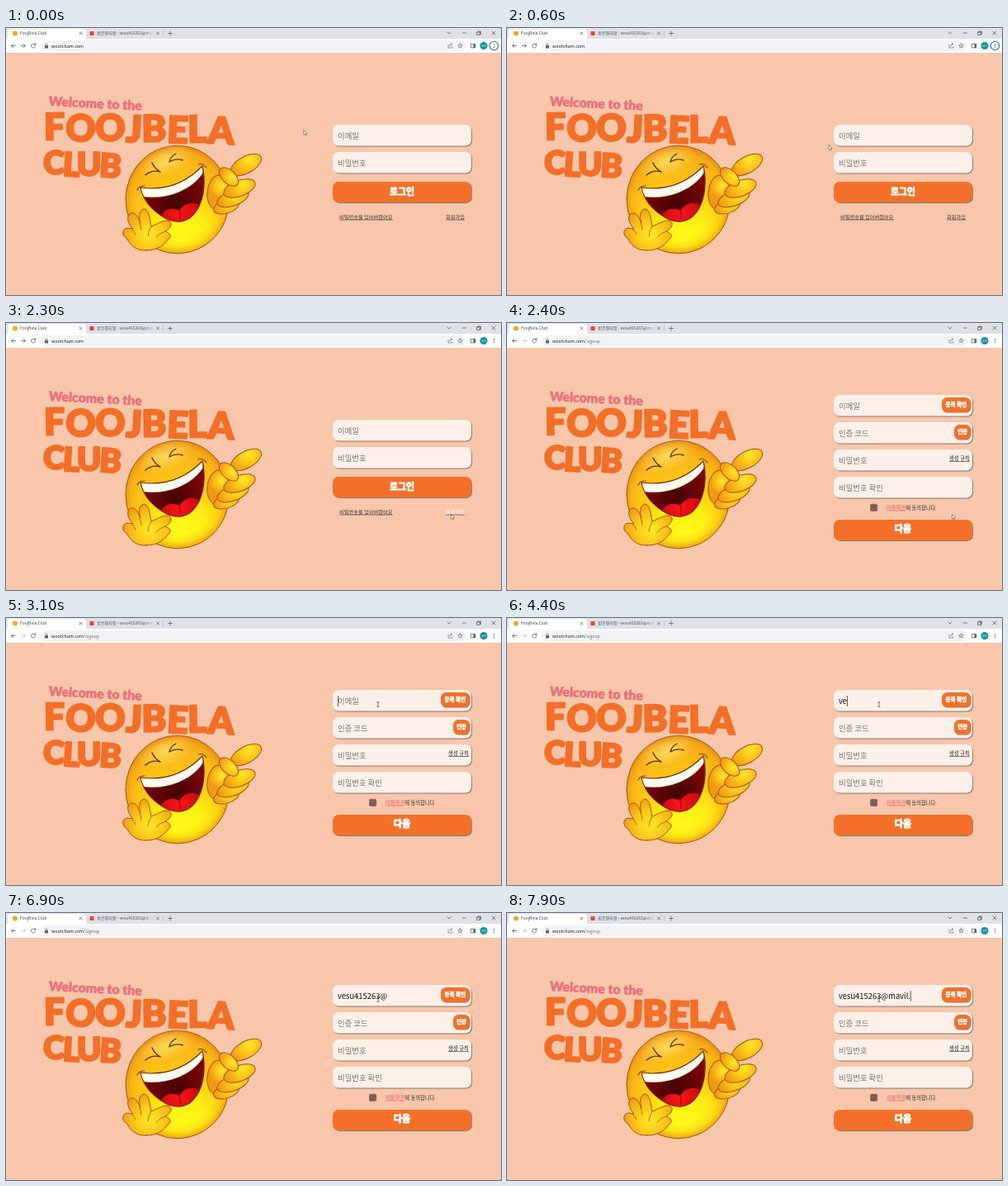
These frames come from a looping animation (600 px wide and 323 px high, 8000 ms). An HTML page with a canvas:

```html
<!DOCTYPE html>
<html lang="ko">
<head>
<meta charset="utf-8">
<title>FoojBela Club</title>
<style>
html, body { margin: 0; width: 100%; height: 100%; overflow: hidden; background: #f8c6aa; }
canvas { display: block; width: 600px; height: 323px; }
</style>
</head>
<body>
<canvas id="stage"></canvas>
<script>
const W = 600, H = 323, LOOP = 8000, STEP = 100;
const canvas = document.getElementById('stage');
const ctx = canvas.getContext('2d');
const scale = window.devicePixelRatio || 1;
canvas.width = W * scale;
canvas.height = H * scale;

const SANS = '"Noto Sans CJK KR", "Noto Sans CJK", "Noto Sans", sans-serif';
const ORANGE = '#f47028', CREAM = '#fdf0e8', INK = '#333', OUTLINE = '#a8520f', CREASE = '#b8600f';
const ADDRESS = 'vesu415263@mavil.';
const SIGNUP_AT = 2400, FOCUS_AT = 3100;

// [time, x, y, shape]
const pointer = [
  [0, 361, 124, 'arrow'], [100, 361, 124, 'arrow'], [300, 378, 134, 'arrow'],
  [600, 390, 142, 'arrow'], [800, 462, 190, 'hand'], [900, 488, 194, 'hand'],
  [1400, 505, 196, 'hand'], [1500, 539.5, 232, 'hand'], [2200, 539.5, 232, 'arrow'],
  [2600, 539.5, 232, 'arrow'], [2900, 484, 142, 'arrow'], [3000, 458, 110, 'beam'],
  [3100, 451, 104.5, 'beam'], [LOOP, 451, 104.5, 'beam']
];
// [time, characters typed]
const keys = [
  [FOCUS_AT, 0], [4300, 1], [4400, 2], [4500, 4], [4800, 4], [5100, 5], [5200, 6],
  [5400, 7], [5500, 8], [5600, 9], [5900, 10], [6400, 11], [7200, 12], [7400, 13],
  [7500, 14], [7600, 15], [7800, 16], [7900, 17]
];

const lastBefore = (list, t) => list.filter(k => k[0] <= t).pop();

function rect(x, y, w, h, r, color) {
  ctx.beginPath();
  ctx.roundRect(x, y, w, h, r);
  ctx.fillStyle = color;
  ctx.fill();
}

function disc(x, y, r, color) {
  ctx.beginPath();
  ctx.arc(x, y, r, 0, Math.PI * 2);
  ctx.fillStyle = color;
  ctx.fill();
}

function line(d, color = '#5f6368', width = 0.8) {
  ctx.strokeStyle = color;
  ctx.lineWidth = width;
  ctx.lineCap = ctx.lineJoin = 'round';
  ctx.stroke(new Path2D(d));
}

function shape(d, fill, stroke, width = 1) {
  ctx.fillStyle = fill;
  ctx.fill(new Path2D(d));
  if (stroke) line(d, stroke, width);
}

function label(text, x, y, size, color = INK, { weight = 400, underline, align = 'left' } = {}) {
  ctx.font = `${weight} ${size}px ${SANS}`;
  ctx.textAlign = align;
  ctx.fillStyle = color;
  ctx.fillText(text, x, y);
  if (weight === 900) {
    ctx.strokeStyle = color;
    ctx.lineWidth = size * 0.08;
    ctx.strokeText(text, x, y);
  }
  const width = ctx.measureText(text).width;
  if (underline) {
    ctx.fillStyle = underline;
    ctx.fillRect(x, y + 0.9, width, 0.6);
  }
  ctx.textAlign = 'left';
  return width;
}

function radial(x, y, r0, r1, ...colors) {
  const g = ctx.createRadialGradient(x, y, r0, x, y, r1);
  colors.forEach((c, i) => g.addColorStop(i / (colors.length - 1), c));
  return g;
}

function drawTabs() {
  rect(0, 0, W, 13, 0, '#dee1e6');
  rect(2, 1, 95, 14, [4, 4, 0, 0], '#fff');
  disc(11, 6.5, 3, '#f5a623');
  label('FoojBela Club', 17, 8.3, 5, '#3c4043');
  rect(101.5, 4, 5, 5, 0.5, '#ea4335');
  const fade = ctx.createLinearGradient(168, 0, 179, 0);
  fade.addColorStop(0, '#4a4e53');
  fade.addColorStop(1, '#dee1e6');
  ctx.save();
  ctx.beginPath();
  ctx.rect(108, 0, 71, 13);
  ctx.clip();
  label('받은편지함 - ' + ADDRESS, 110.5, 8.3, 5, fade);
  ctx.restore();
  for (const x of [90.5, 184]) line(`M${x - 1.5} 5l3 3m0 -3l-3 3`);
  line('M190.5 3.5v6', '#a0a4a9', 0.5);
  line('M196.5 6.5h5m-2.5 -2.5v5');
  line('M535 5l2 2l2 -2M553.5 6h4M571 5h3.4v3.4h-3.4zM572 5v-1h3.4v3.4h-1M589 4l4 4m0 -4l-4 4', '#333', 0.6);
}

function drawToolbar(t) {
  const signup = t >= SIGNUP_AT;
  rect(0, 13, W, 17, 0, '#fff');
  line('M11.5 21.5h-5m2.2 -2.2l-2.2 2.2l2.2 2.2');
  line('M18.5 21.5h5m-2.2 -2.2l2.2 2.2l-2.2 2.2', signup ? '#c4c7ca' : '#5f6368');
  line('M35.4 20a2.6 2.6 0 1 0 .4 2M35.9 18.4v2h-2');
  rect(42, 15, 515, 13, 6.5, '#f1f3f4');
  rect(47, 21, 4, 3.4, 0.5, '#5f6368');
  line('M47.9 21v-1a1.1 1.1 0 0 1 2.2 0v1', '#5f6368', 0.6);
  const end = 55 + label('wootcham.com', 55, 23.5, 5.4, '#202124');
  if (signup) label('/signup', end, 23.5, 5.4, '#6a6e73');
  line('M536 20v4h5v-1.5M537.5 22q.3 -2.5 3 -2.5m-1.2 -1.3l1.5 1.3l-1.5 1.4', '#5f6368', 0.6);
  let star = '';
  for (let i = 0; i < 10; i++) {
    const r = i % 2 ? 1.2 : 2.9, a = i * Math.PI / 5 - Math.PI / 2;
    star += (i ? 'L' : 'M') + (550.5 + r * Math.cos(a)) + ' ' + (21.7 + r * Math.sin(a));
  }
  line(star + 'Z', '#5f6368', 0.6);
  line('M563.8 19.3h5v4.6h-5z');
  rect(566.5, 19.3, 2.4, 4.6, 0, '#5f6368');
  disc(579, 21.5, 4.6, '#14949c');
  label('보리', 579, 22.8, 3.4, '#e6f4f4', { align: 'center' });
  if (t < 2200) {
    disc(591.5, 21.5, 5.4, '#fff');
    line('M586.3 21.5a5.2 5.2 0 1 1 10.4 0a5.2 5.2 0 1 1 -10.4 0', '#2b6fc2', 1.1);
  }
  for (const y of [19.4, 21.5, 23.6]) disc(591.5, y, 0.65, '#5f6368');
}

// Bouncy lettering: each letter is tilted slightly on a shared slope.
function wordmark(text, x, y, size, spacing, slope) {
  ctx.font = `900 ${size}px Lato, sans-serif`;
  ctx.fillStyle = ctx.strokeStyle = '#f36f27';
  ctx.lineWidth = 2;
  ctx.lineJoin = 'round';
  ctx.save();
  ctx.translate(x, y);
  ctx.rotate(slope);
  [...text].forEach((ch, i) => {
    const w = ctx.measureText(ch).width;
    ctx.save();
    ctx.translate(w / 2, i % 2 ? 0.8 : -0.4);
    ctx.rotate(i % 2 ? 0.03 : -0.03);
    ctx.fillText(ch, -w / 2, 0);
    ctx.strokeText(ch, -w / 2, 0);
    ctx.restore();
    ctx.translate(w + spacing, 0);
  });
  ctx.restore();
}

function drawTitle() {
  ctx.save();
  ctx.translate(51.5, 94);
  ctx.rotate(0.05);
  ctx.font = '900 15.8px Lato, sans-serif';
  ctx.fillStyle = ctx.strokeStyle = '#e9727c';
  ctx.lineWidth = 0.5;
  ctx.fillText('Welcome to the', 0, 0);
  ctx.strokeText('Welcome to the', 0, 0);
  ctx.restore();
  wordmark('FOOJBELA', 46, 135.5, 45, 0, 0.018);
  wordmark('CLUB', 45, 177.5, 40, -3.2, 0.03);
}

function finger(x, y, rx, ry, tilt) {
  ctx.save();
  ctx.translate(x, y);
  ctx.rotate(tilt);
  const oval = `M${-rx} 0a${rx} ${ry} 0 1 1 ${2 * rx} 0a${rx} ${ry} 0 1 1 ${-2 * rx} 0`;
  shape(oval, radial(rx * 0.3, -ry * 0.4, 1, rx * 1.2, '#ffe428', '#fcc018', '#f09a14'), OUTLINE);
  ctx.restore();
}

function drawBody() {
  const ball = 'M145 207.5a62.8 65.3 0 1 0 125.6 0a62.8 65.3 0 1 0 -125.6 0';
  shape(ball, radial(214, 254, 4, 116, '#fffa18', '#ffec14', '#fdc814', '#fab718', '#f7a81a'));
  shape(ball, radial(208, 207.5, 48, 66, 'rgba(226,120,10,0)', 'rgba(226,120,10,.15)', 'rgba(218,108,10,.6)'), OUTLINE);
  ctx.save();
  ctx.translate(194, 161);
  ctx.rotate(-0.35);
  ctx.scale(1, 0.5);
  disc(0, 0, 36, radial(0, 0, 2, 36, 'rgba(255,240,130,.6)', 'rgba(255,240,130,0)'));
  ctx.restore();
}

function drawMouth() {
  const mouth = 'M163 193Q207 199 238 167C242 183 241 206 231 221C220 238 203 237 188 227C174 218 166 207 163 193Z';
  shape(mouth, radial(205, 212, 4, 40, '#4a0204', '#7c0608'));
  ctx.save();
  ctx.clip(new Path2D(mouth));
  shape('M187 238C185 222 198 215 210 221C217 211 229 209 236 216L228 242Z', radial(210, 224, 3, 26, '#f41418', '#cc0810'));
  line('M210 221Q212 226 211 231', '#9a060c', 1);
  shape('M160 190Q207 199 240 164L238 176C226 195 196 208 167 204Z', '#fffdf0', '#c9b9a0', 0.5);
  ctx.restore();
  line(mouth, '#7a2a08', 1.1);
  line('M159 196Q161 191 168 191M233 165Q239 163 243 169', '#8d3c08', 1.2);
}

function drawLaugher() {
  drawBody();
  line('M177 163Q180 170 187 174M169 178Q177 171 187 174M198 162Q199 156 206 152M198 162Q206 157 214 160', '#6d2f06', 1.4);
  drawMouth();

  finger(257, 199, 13, 21, 0.1);
  finger(267, 216, 16, 8, -0.3);
  finger(275, 206, 20, 9, -0.35);
  finger(283, 194, 20, 9.5, -0.35);
  finger(291, 165.5, 20.5, 10, -0.5);
  finger(270, 180, 14, 8, 0.75);

  const palm = radial(174, 250, 4, 34, '#ffe222', '#fcc41a', '#ee9a16');
  shape('M170 269C156 270 149 260 147 255C140 252 140 243 147 242L154 243C147 236 145 226 152 224C158 223 160 230 163 236C160 227 162 219 168 219C174 221 174 232 176 240C182 238 190 232 197 233C203 236 200 242 193 246C198 248 202 252 197 255C192 262 184 269 170 269Z', palm, OUTLINE);
  line('M152 243Q156 246 157 250M162 236Q164 240 164 244M176 240Q172 246 172 252M193 246Q186 248 182 253', CREASE, 0.9);
}

function panel(y, h, color, hovered = false) {
  ctx.save();
  ctx.shadowColor = hovered ? '#1c1008' : '#85786f';
  ctx.shadowOffsetX = ctx.shadowOffsetY = (hovered ? 2.2 : 0.9) * scale;
  ctx.shadowBlur = scale;
  rect(396, y, 168, h, 7, color);
  ctx.restore();
}

function field(y, hint) {
  panel(y, 25.6, CREAM);
  if (hint) label(hint, 402, y + 16.7, 9.4, '#757575');
}

function chip(text, x, y, w) {
  ctx.save();
  ctx.shadowColor = 'rgba(90,70,60,.7)';
  ctx.shadowOffsetX = ctx.shadowOffsetY = 0.6 * scale;
  ctx.shadowBlur = scale;
  rect(x, y, w, 18, 6.5, ORANGE);
  ctx.restore();
  label(text, x + w / 2, y + 10.9, 6.6, '#fff', { weight: 900, align: 'center' });
}

function drawLogin(t) {
  field(117, '이메일');
  field(150, '비밀번호');
  panel(186, 25, ORANGE, t >= 800 && t < 1500);
  label('로그인', 480, 201.6, 10.9, '#fff', { weight: 900, align: 'center' });
  label('비밀번호를 잊어버렸어요', 404, 230.8, 6.24, INK, { underline: INK });
  label('회원가입', 533, 230.8, 6.24, t >= 1500 ? '#fff' : INK, { underline: INK });
}

function drawSignup(t) {
  const key = lastBefore(keys, t);
  const typed = ADDRESS.slice(0, key ? key[1] : 0);
  field(87, typed ? '' : '이메일');
  const width = label(typed, 402, 103.7, 9.4, '#111');
  if (key && Math.floor((t - key[0]) / 500) % 2 === 0) {
    ctx.fillStyle = '#222';
    ctx.fillRect(402 + width, 94, 0.7, 13);
  }
  field(120, '인증 코드');
  field(153, '비밀번호');
  field(186, '비밀번호 확인');
  chip('중복 확인', 527, 90, 35);
  chip('인증', 542, 123, 20);
  label('생성 규칙', 536, 166.4, 6.4, '#222', { underline: '#222' });
  rect(440, 218.8, 9.2, 9.2, 2, '#d9604a');
  rect(440.8, 219.6, 7.6, 7.6, 1.2, '#6d6260');
  const end = 460 + label('이용약관', 460, 225.8, 6.3, '#f0565c', { underline: '#f0565c' });
  label('에 동의합니다.', end, 225.8, 6.3);
  panel(238, 25, ORANGE);
  label('다음', 480, 253.3, 11.2, '#fff', { weight: 900, align: 'center' });
}

function drawPointer(t) {
  const a = lastBefore(pointer, t);
  const b = pointer[pointer.indexOf(a) + 1];
  const p = (t - a[0]) / (b[0] - a[0]);
  ctx.save();
  ctx.translate(a[1] + (b[1] - a[1]) * p, a[2] + (b[2] - a[2]) * p);
  if (a[3] === 'arrow') shape('M0 0v5.2l1.2 -1l1 2l.9 -.5l-1 -1.9h1.7z', '#fff', '#333', 0.5);
  else if (a[3] === 'hand') shape('M0 .5q.8 -.9 1.4 0v2.6l2.6 .7q.8 .3 .6 1.3l-.6 2.6h-3.6l-2 -3q.3 -1 1.6 0z', '#fff', '#222', 0.6);
  else line('M-1.2 -2.7h2.4M0 -2.7v5.4M-1.2 2.7h2.4', '#333', 0.6);
  ctx.restore();
}

function draw(t) {
  ctx.setTransform(scale, 0, 0, scale, 0, 0);
  rect(0, 0, W, H, 0, '#f8c6aa');
  drawTabs();
  drawToolbar(t);
  drawTitle();
  drawLaugher();
  (t < SIGNUP_AT ? drawLogin : drawSignup)(t);
  drawPointer(t);
}

const start = performance.now();
function tick() {
  const t = (performance.now() - start) % LOOP;
  draw(Math.floor(t / STEP) * STEP);
  requestAnimationFrame(tick);
}
tick();
</script>
</body>
</html>
```
